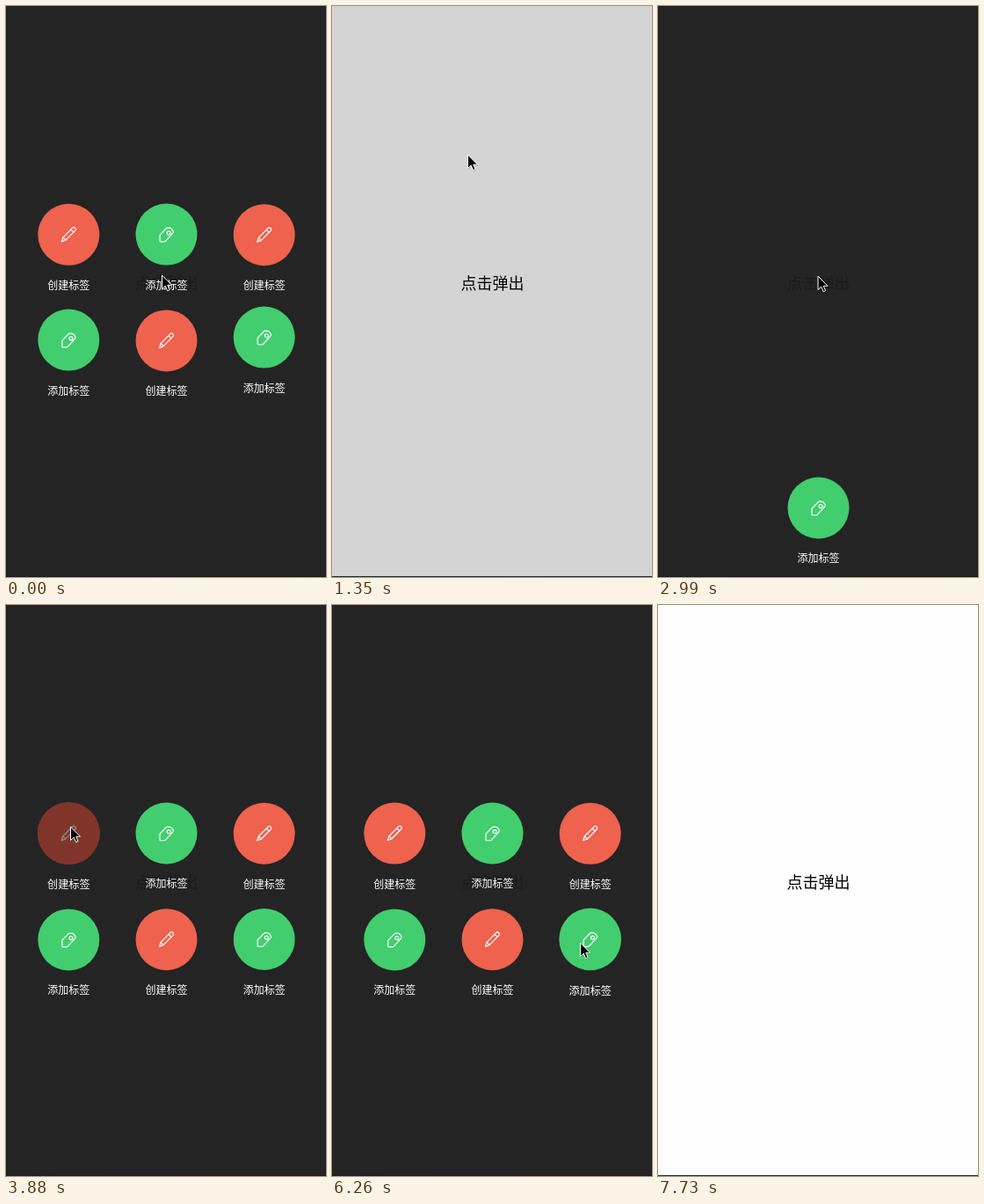
An HTML page for the animation above (7.76 s loop, 364 by 649 pixels).

```html
<!DOCTYPE html>
<html lang="zh">
<head>
<meta charset="utf-8">
<style>
  html, body { margin: 0; width: 100%; height: 100%; overflow: hidden; background: #fefefe; }
  svg { display: block; width: 100%; height: 100%; }
  text { font-family: "Noto Sans CJK SC", "Noto Sans CJK", "Noto Sans CJK JP", sans-serif; text-anchor: middle; }
  .icon { fill: none; stroke: #fff; stroke-width: 1.2; stroke-linejoin: round; stroke-linecap: round; }
</style>
</head>
<body>
<svg viewBox="0 0 364 649">
  <defs>
    <linearGradient id="edge">
      <stop offset="0" stop-color="#141b33"/>
      <stop offset=".45" stop-color="#17182a"/>
      <stop offset=".75" stop-color="#2a1218"/>
      <stop offset="1" stop-color="#1c1620"/>
    </linearGradient>
    <g id="pencil" class="icon">
      <path d="M-8 8L-6.4 3.2 4.4 -7.7Q5.9 -9.1 7.3 -7.7 8.8 -6.2 7.4 -4.8L-3.4 6.2Z"/>
      <path d="M-6.4 3.2L-3.4 6.2M2.5 -5.8L5.5 -2.8"/>
    </g>
    <g id="tag" class="icon">
      <path d="M-7.5 .8L-.5 -6.6Q.3 -7.4 1.5 -7.4L4 -7.2Q5 -7 5.8 -6.2L7.4 -4Q8.3 -2.8 7.3 -1.6L-1.2 7.7Q-1.8 8.3 -2.6 8.3L-6.5 8.3Q-7.5 8.3 -7.5 7.3Z"/>
      <circle cx="2.6" cy="-1.8" r="2"/>
    </g>
  </defs>
  <rect width="364" height="649" fill="#fefefe"/>
  <text x="182.5" y="321.5" font-size="18">点击弹出</text>
  <rect id="dim" width="364" height="649" fill="#1c1c1c"/>
  <rect y="648" width="364" height="1" fill="#16303c"/>
  <rect id="darkEdge" y="648" width="364" height="1" fill="url(#edge)"/>
  <g id="menu"></g>
  <g id="cursor">
    <path d="M0 0V15.5L3.7 12.1 6.2 17.7 8.6 16.6 6.2 11.2H11Z" transform="translate(.6 1.2)" fill="#000" opacity=".25"/>
    <path d="M0 0V15.5L3.7 12.1 6.2 17.7 8.6 16.6 6.2 11.2H11Z" fill="#000" stroke="#fff" stroke-width="1"/>
  </g>
</svg>
<script>
const LOOP = 7760, TRAVEL = 430, DELAY = 0.07;
const $ = id => document.getElementById(id);

// The picture advances in ticks of 150 ms; a few last 140 ms.
const shortTicks = [19, 22, 27, 35, 42, 48, 51];
const ticks = [0];
for (let n = 0; n < 52; n++) ticks.push(ticks[n] + (shortTicks.includes(n) ? 140 : 150));

// Keys: [tick, value...]
const dimKeys = [[0, .96], [7, .96], [8, .7], [9, .185], [10, 0], [17, 0], [18, .5], [19, .96],
  [26, .96], [27, .45], [28, 0], [34, 0], [35, .5], [36, .96], [42, .96], [43, .45], [44, 0]];
const cursorKeys = [[0, 177.5, 306], [1, 177.5, 306], [5, 148, 190], [7, 154.5, 169], [10, 154.5, 169],
  [16, 182, 307], [22, 182, 307], [26, 73.5, 252], [30, 73.5, 252], [34, 179.5, 312],
  [38, 179.5, 312], [42, 282.5, 384], [45, 282.5, 384], [50, 341, 651]];
const dropKeys = [[7, 0], [8, 150], [9, 450]];

// Each opening: start of the springs in seconds, last tick, chosen button
const openings = [
  { start: -0.875, end: 9, pick: -1 },
  { start: 2.918, end: 28, pick: 0, press: 26 },
  { start: 5.3, end: 44, pick: 5 }
];
const order = [1, 0, 2, 4, 3, 5];

function at(keys, n) {
  if (n <= keys[0][0]) return keys[0].slice(1);
  for (let i = 1; i < keys.length; i++) {
    const a = keys[i - 1], b = keys[i];
    if (n <= b[0]) {
      const p = (n - a[0]) / (b[0] - a[0]);
      return a.slice(1).map((v, j) => v + (b[j + 1] - v) * p);
    }
  }
  return keys[keys.length - 1].slice(1);
}

// Damped spring from 1 to 0
function spring(t) {
  const decay = 9.1, freq = 9.28;
  return Math.exp(-decay * t) * (Math.cos(freq * t) + decay / freq * Math.sin(freq * t));
}

$("menu").innerHTML = order.map((_, i) => {
  const red = i % 2 === 0;
  return `<g><g><circle r="35" fill="${red ? "#ee624e" : "#42cd6e"}"/>
    <use href="#${red ? "pencil" : "tag"}"/>
    <circle class="shade" r="35" opacity="0"/></g>
    <text y="62" font-size="12" fill="#fff">${red ? "创建标签" : "添加标签"}</text></g>`;
}).join("");
const buttons = [...$("menu").children];

function drawButton(el, i, n, sec, open) {
  const age = open ? sec - open.start - order.indexOf(i) * DELAY : 0;
  el.style.display = age > 0 ? "" : "none";
  if (age <= 0) return;
  let y = 259.5 + 120 * Math.floor(i / 3) + TRAVEL * spring(age);
  let scale = 1, alpha = 1;
  const chosen = i === open.pick;
  if (open.pick < 0) y += at(dropKeys, n)[0];
  else if (n === open.end - 1) {
    scale = chosen ? 1.4 : 0.7;
    alpha = chosen ? 0.5 : 0.35;
  } else if (chosen && n === open.end - 2) scale = 1.01;
  el.setAttribute("transform", `translate(${71.3 + 111.2 * (i % 3)} ${y}) scale(${scale})`);
  el.setAttribute("opacity", alpha);
  el.querySelector(".shade").setAttribute("opacity", chosen && n === open.press ? 0.46 : 0);
}

function draw(ms) {
  let n = 52;
  while (ticks[n] > ms) n--;
  const sec = ticks[n] / 1000;
  const [dim] = at(dimKeys, n), [x, y] = at(cursorKeys, n);
  $("dim").setAttribute("opacity", dim);
  $("darkEdge").setAttribute("opacity", dim / 0.96);
  $("cursor").setAttribute("transform", `translate(${x} ${y})`);
  const open = openings.find(o => sec > o.start && n < o.end);
  buttons.forEach((el, i) => drawButton(el, i, n, sec, open));
}

const begin = performance.now();
function loop() {
  draw((performance.now() - begin) % LOOP);
  requestAnimationFrame(loop);
}
loop();
</script>
</body>
</html>
```
